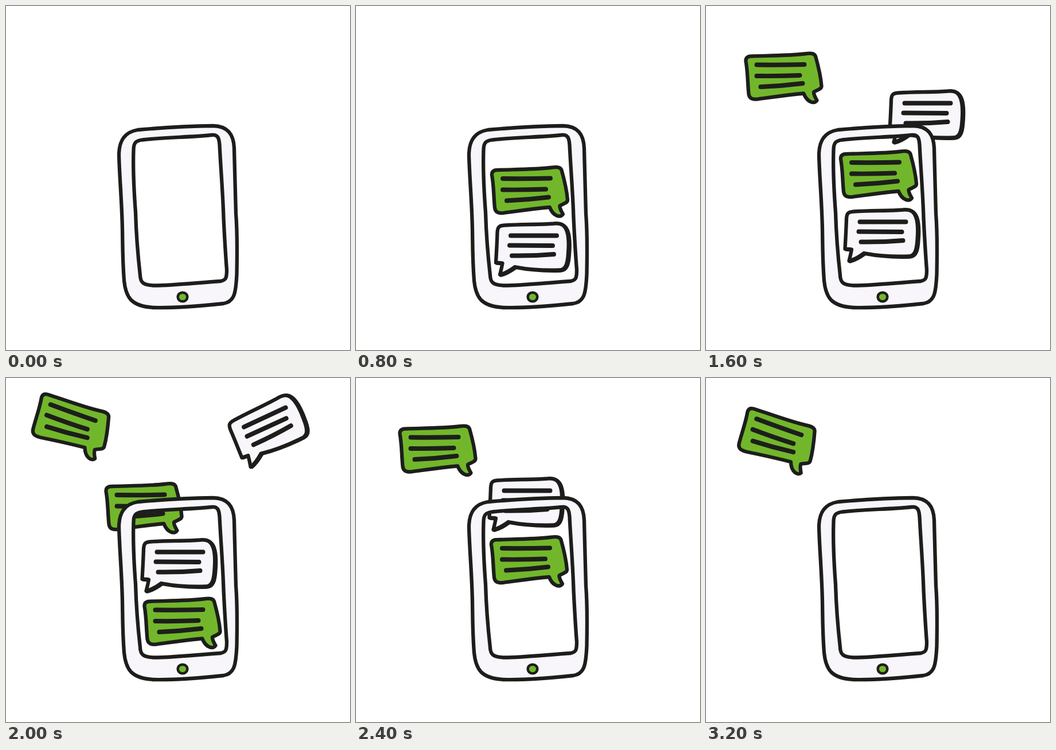
An HTML page for the animation above (3.4 s loop, 600 by 600 pixels).

```html
<!DOCTYPE html>
<html lang="en">
<head>
<meta charset="utf-8">
<title>Chat bubbles</title>
<style>
  html, body { margin: 0; width: 100%; height: 100%; overflow: hidden; background: #fff; }
  svg { display: block; width: 100%; height: 100%; }
  path, ellipse { stroke: #1d1e1c; stroke-width: 6.3; stroke-linejoin: round; stroke-linecap: round; }
  .green { fill: #72b72b; }
  .pale { fill: #f8f6fb; }
  .text { fill: none; stroke-width: 8; }
</style>
</head>
<body>
<svg viewBox="0 0 600 600">
  <defs>
    <path id="card" d="M246.500 395C247 386 249 383 259 382.500C290 380.500 320 381.500 345 379.500C359 378 364 383 367.500 392C371.500 403 371 420 370 432C369 449 366 460 355 460.500C328 461.500 298 459 277 455C270 460 262 466 251 468.500Q254 457 255.500 448.500L244 447.500C245 430 246 412 246.500 395Z"/>
    <g id="sent" transform="translate(-303 -324)">
      <path class="green" d="M237 295C236.500 288 241 286 248 286C278 285 315 285 339 282C350 280.500 356 280.500 358.500 286C363 302 368 325 369 338C369.500 344 360 345 355.500 348.500C355 353 358 358 361 363C357 370 344 367 337.800 351C305 354 280 358 257.500 361C247 362 243 359 242 352C240 333 240.500 314 237 295Z"/>
      <path class="text" d="M256 301Q300 301.500 339 300.500M256 320.500Q295 321 331 319.500M263 339.500Q300 338 336 333.500"/>
    </g>
    <g id="received" transform="translate(-308.500 -424)">
      <use href="#card" x="2" y="1"/>
      <use href="#card" class="pale"/>
      <path class="text" d="M270 400.500H350M268 417.500L343 418M272 435.500Q310 436 345 433"/>
    </g>
  </defs>

  <g id="bubbles"></g>

  <path class="pale" fill-rule="evenodd" d="M197 260C197 236 206 220 230 216C275 212 320 209.500 361 209C387 209.500 397 224 398 248C399 290 400 335 401 362C404 400 403 440 402.500 468C401 499 399 516 379 519C330 524 285 527 258 526C220 524 209 510 206 479C203 440 203.500 410 203 390C202 340 198 300 197 260ZM222.500 251C222.500 238 227 235 237.500 233.500C275 229 320 229 359 225C369.500 224 371.500 230 372.500 242C374.500 283 378.500 330 379.500 370C381.500 410 383 435 385 460C385 474 384 478 374.500 480C330 483 290 487.500 259 487.500C240 487 234.500 483 234 470C229.500 430 227 395 226 360C223 320 221.500 280 222.500 251Z"/>
  <ellipse class="green" cx="308" cy="507.500" rx="8.300" ry="7.800" style="stroke-width:4.500"/>
</svg>

<script>
const BEAT = 200, BEATS = 17;
const leave = { sent: [-82, -82], received: [51, -16] };

// Key points: beat, centre x, centre y, turn in degrees
const bubbles = [
  ['sent', [[2, 308, 422], [4, 303, 324], [6, 240.5, 227], [8, 135.5, 125.5], [9, 104, 93, 8], [10, 114, 84, 20]]],
  ['received', [[4, 308.5, 424], [6, 302, 327], [7, 299, 257], [8, 385, 193], [10, 460, 90.5, -25]]],
  ['sent', [[6, 307.5, 427.5], [8, 301, 296], [10, 240.5, 227], [12, 142.5, 126.5]]],
  ['received', [[8, 307, 400], [10, 302, 327], [12, 297, 220], [14, 460, 90.5, -25]]],
  ['sent', [[10, 307.5, 427.5], [12, 302, 320], [14, 268, 254], [16, 124.5, 109, 20]]]
];

const layer = document.getElementById('bubbles');
const items = bubbles.map(([shape, path]) => {
  const node = document.createElementNS('http://www.w3.org/2000/svg', 'use');
  node.setAttribute('href', '#' + shape);
  layer.append(node);
  const first = path[0], last = path[path.length - 1];
  const [dx, dy] = leave[shape];
  const keys = [
    [first[0] - 1, 310, 480],
    ...path,
    [last[0] + 1, last[1] + dx, last[2] + dy, last[3]]
  ];
  return { node, keys };
});

function place({ node, keys }, beat) {
  const start = keys[0][0];
  const next = keys.findIndex(key => key[0] >= beat);
  const visible = beat >= start && next >= 0;
  node.style.display = visible ? '' : 'none';
  if (!visible) return;
  const b = keys[next], a = keys[next - 1] || b;
  // Slow start over the screen, slow stop once out of it
  const power = Math.abs(a[1] - 300) > 25 ? 0.6 : 1.4;
  const mix = a === b ? 0 : ((beat - a[0]) / (b[0] - a[0])) ** power;
  const [x, y, turn] = [1, 2, 3].map(i => (a[i] || 0) * (1 - mix) + (b[i] || 0) * mix);
  const scale = beat === start ? 0.93 : 1;
  node.setAttribute('transform', `translate(${x} ${y}) rotate(${turn}) scale(${scale})`);
}

function draw() {
  const beat = Math.floor(performance.now() / BEAT) % BEATS;
  items.forEach(item => place(item, beat));
  requestAnimationFrame(draw);
}
draw();
</script>
</body>
</html>
```
